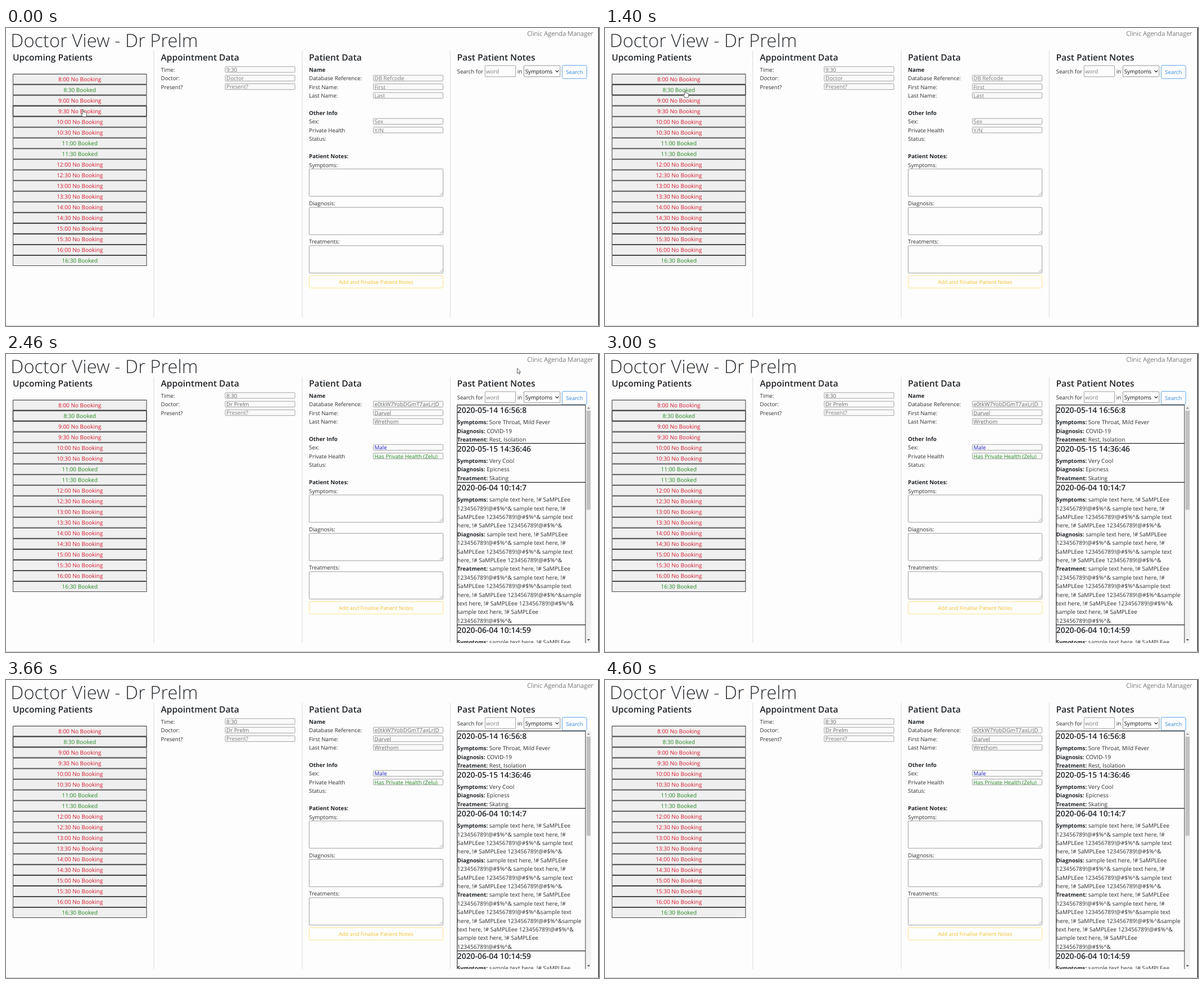
Recreate the animation shown at these times as an HTML page. Size 1055 by 531 pixels, loop 4660 ms.

```html
<!DOCTYPE html>
<html lang="en">
<head>
<meta charset="utf-8">
<title>Doctor View</title>
<style>
  html, body { margin: 0; width: 100%; height: 100%; overflow: hidden; background: #fdfdfd; }
  svg { display: block; width: 1055px; height: 531px; }
  text { font-family: "Open Sans", "Noto Sans", sans-serif; text-rendering: geometricPrecision; white-space: pre; }
</style>
</head>
<body>
<svg id="stage" viewBox="0 0 1055 531"></svg>
<script>
const LOOP = 4660, FOCUS_AT = 1400, LOAD_AT = 1800, BLUR_AT = 4000;
const PAPER = '#fdfdfd', INK = '#2b2f33', DARK = '#212529', GREY = '#777b7f', RED = '#d8192f', GREEN = '#228b22';
const stage = document.getElementById('stage');

function add(parent, tag, attrs, content) {
  const node = document.createElementNS('http://www.w3.org/2000/svg', tag);
  for (const key in attrs) node.setAttribute(key, attrs[key]);
  if (content !== undefined) node.textContent = content;
  parent.appendChild(node);
  return node;
}

// Text is placed by the vertical middle of its capitals.
function label(parent, x, middle, content, { size = 9.8, weight = 400, fill = INK, anchor = 'start' } = {}) {
  return add(parent, 'text', {
    x, y: middle + size * 0.36, 'font-size': size, 'font-weight': weight, fill, 'text-anchor': anchor
  }, content);
}

function box(parent, x, y, width, height, stroke, fill = PAPER, line = 0.9, rx = 1) {
  return add(parent, 'rect', { x, y, width, height, stroke, fill, 'stroke-width': line, rx });
}

function path(parent, d, attrs) {
  return add(parent, 'path', { d, fill: 'none', ...attrs });
}

const heading = (x, content) => label(stage, x, 52.2, content, { size: 15.6, weight: 600, fill: DARK });
const bold = (x, y, content) => label(stage, x, y, content, { weight: 700, fill: DARK });

// Page frame
label(stage, 8.3, 22.5, 'Doctor View - Dr Prelm', { size: 32.7, weight: 300 });
label(stage, 1045, 10, 'Clinic Agenda Manager', { size: 11.5, weight: 300, fill: '#33373b', anchor: 'end' });
for (const x of [263, 527, 790.3]) path(stage, `M${x} 41V515`, { stroke: '#d2d3d4', 'stroke-width': 0.9 });
path(stage, 'M1054.3 0V531', { stroke: '#222', 'stroke-width': 1.3 });
path(stage, 'M0 530.5H1055', { stroke: '#c8c8c8' });
heading(12, 'Upcoming Patients');
heading(275.5, 'Appointment Data');
heading(539, 'Patient Data');
heading(802.5, 'Past Patient Notes');

// Booking slots
const PITCH = 19.02, booked = [1, 6, 7, 17];
const slots = Array.from({ length: 18 }, (_, i) => {
  const y = 81.6 + i * PITCH, isBooked = booked.includes(i);
  const frame = box(stage, 12.5, y + 0.5, 237.6, 18, '#484848', '#efefef', 1.05, 0.3);
  const time = `${8 + (i >> 1)}:${i % 2 ? '30' : '00'}`;
  label(stage, 131.3, y + 9.9, `${time} ${isBooked ? 'Booked' : 'No Booking'}`,
    { size: 10, fill: isBooked ? GREEN : RED, anchor: 'middle' });
  return frame;
});

// Read-only fields; each switches from its first value to its loaded one
const fields = [];
function field(x, y, before, after, fill = '#666a6e') {
  const id = `clip${fields.length}`;
  box(stage, x, y - 5.2, 124, 10.3, '#999', '#fafafa');
  add(add(stage, 'clipPath', { id }), 'rect', { x, y: y - 5, width: 123, height: 9.8 });
  const clipped = add(stage, 'g', { 'clip-path': `url(#${id})` });
  const node = label(clipped, x + 2, y + 0.3, before, { fill: GREY });
  fields.push({ node, before, after, fill });
}
['Time:', 'Doctor:', 'Present?'].forEach((name, i) => label(stage, 275.5, 74.2 + i * 15.4, name));
field(390, 74, '9:30', '8:30');
field(390, 89.4, 'Doctor', 'Dr Prelm');
field(390, 104.6, 'Present?', 'Present?', GREY);

bold(539, 74.5, 'Name');
['Database Reference:', 'First Name:', 'Last Name:'].forEach((name, i) => label(stage, 539, 89.8 + i * 15.4, name));
field(653.5, 89.4, 'DB Refcode', 'e0tkW7YobDGmT7axLrJD');
field(653.5, 104.8, 'First', 'Darvel');
field(653.5, 120.2, 'Last', 'Wrethom');
bold(539, 151.6, 'Other Info');
['Sex:', 'Private Health', 'Status:'].forEach((name, i) => label(stage, 539, 166.8 + i * 15.4, name));
field(653.5, 166.4, 'Sex', 'Male', '#2323c4');
field(653.5, 181.8, 'Y/N', 'Has Private Health (Zelu)', GREEN);

bold(539, 228.6, 'Patient Notes:');
['Symptoms:', 'Diagnosis:', 'Treatments:'].forEach((name, i) => {
  const y = 251.1 + i * 68.4;
  label(stage, 539, y - 7.1, name);
  box(stage, 539.4, y, 238.2, 48.8, '#959595');
  path(stage, `M771.5 ${y + 47}l5 -5M774.3 ${y + 47}l2.2 -2.2`, { stroke: '#888', 'stroke-width': 0.7 });
});
box(stage, 539.4, 441.2, 238.2, 22, '#ffdf80', PAPER, 0.9, 2.5);
label(stage, 658.3, 452.4, 'Add and Finalise Patient Notes', { size: 9.35, fill: '#f2c230', anchor: 'middle' });

// Search bar
label(stage, 802.5, 77.4, 'Search for');
box(stage, 852.3, 67, 54.4, 19.8, '#949494');
label(stage, 854, 77, 'word', { fill: GREY });
label(stage, 909.7, 77.4, 'in');
box(stage, 921.4, 67, 64.4, 19.8, '#888');
label(stage, 923.7, 77.2, 'Symptoms', { fill: '#111' });
path(stage, 'M977.7 75.6l2.8 2.8l2.8 -2.8', { stroke: '#222', 'stroke-width': 1.3 });
box(stage, 989.4, 66.5, 43.8, 23.6, '#4c9be8', PAPER, 0.9, 2.6);
label(stage, 1011.3, 78.3, 'Search', { size: 9.5, fill: '#2f87dd', anchor: 'middle' });

// Past notes; a leading name before the colon is set in bold
const notes = add(stage, 'g', {});
add(add(stage, 'clipPath', { id: 'notesClip' }), 'rect', { x: 802, y: 90, width: 240, height: 425 });
notes.setAttribute('clip-path', 'url(#notesClip)');
const sample = ['sample text here, !# SaMPLEee', '123456789!@#$%^& sample text here, !#',
  'SaMPLEee 123456789!@#$%^& sample text', 'here, !# SaMPLEee 123456789!@#$%^&'];
const entries = [
  [90.8, '2020-05-14 16:56:8', ['Symptoms: Sore Throat, Mild Fever', 'Diagnosis: COVID-19', 'Treatment: Rest, Isolation']],
  [159.4, '2020-05-15 14:36:46', ['Symptoms: Very Cool', 'Diagnosis: Epicness', 'Treatment: Skating']],
  [228.6, '2020-06-04 10:14:7', [
    `Symptoms: ${sample[0]}`, ...sample.slice(1),
    `Diagnosis: ${sample[0]}`, ...sample.slice(1),
    `Treatment: ${sample[0]}`, '123456789!@#$%^& sample text here, !#',
    'SaMPLEee 123456789!@#$%^&sample text', 'here, !# SaMPLEee 123456789!@#$%^&sample',
    'text here, !# SaMPLEee 123456789!@#$%^&', 'sample text here, !# SaMPLEee', '123456789!@#$%^&']],
  [482.6, '2020-06-04 10:14:59', [`Symptoms: ${sample[0]}`]]
];
for (const [top, date, lines] of entries) {
  path(notes, `M802.5 ${top}H1031`, { stroke: '#222', 'stroke-width': 1.2 });
  label(notes, 802.8, top + 9.6, date, { size: 13.9, weight: 600, fill: DARK });
  lines.forEach((line, i) => {
    const [, name, rest] = line.match(/^([A-Z][a-z]+:)?(.*)$/);
    const node = label(notes, 802.8, top + 31 + i * 15.4, '', { size: 10.1 });
    if (name) add(node, 'tspan', { 'font-weight': 700, 'font-size': 9.8, fill: DARK }, name);
    add(node, 'tspan', {}, rest);
  });
}
path(notes, 'M802.8 91V515M1031 91V515', { stroke: '#222', 'stroke-width': 1.1 });
add(notes, 'rect', { x: 1031.6, y: 91, width: 9.4, height: 424, fill: '#f1f1f1' });
add(notes, 'rect', { x: 1032.8, y: 101, width: 7.2, height: 176.5, fill: '#c1c1c1' });
path(notes, 'M1033.8 97.5l2.6 -3l2.6 3z', { fill: '#8a8a8a' });
path(notes, 'M1033.8 508l2.6 3l2.6 -3z', { fill: '#505050' });

// Pointers, drawn from their hot spot
const pen = { fill: '#fff', stroke: '#333', 'stroke-width': 0.75, 'stroke-linejoin': 'round' };
const hand = path(stage, 'M-1 .8Q0 -.6 1 .8V5Q2 4.3 2.8 5.2Q4 4.6 4.6 5.6Q6.2 5.2 6.3 6.8V9.5Q6.2 11 5.2 13H-.6Q-1.5 11.2 -3.4 8.4Q-3 7 -1 8.6Z', pen);
const arrow = path(stage, 'M0 0V9L2 7.2L3.4 10.4L4.8 9.8L3.4 6.7H6.2Z', pen);

const keys = [[0, 137, 145], [130, 137, 145], [530, 142.5, 111], [1530, 142.5, 111],
  [1800, 187.5, 95], [2460, 909.5, 25.5], [2600, 925, -16]];
const ease = u => u * u * (3 - 2 * u);

function pointerAt(t) {
  const next = keys.findIndex(key => key[0] > t);
  if (next < 0) return keys[keys.length - 1].slice(1);
  const [t0, x0, y0] = keys[next - 1], [t1, x1, y1] = keys[next];
  const u = ease((t - t0) / (t1 - t0));
  return [x0 + (x1 - x0) * u, y0 + (y1 - y0) * u];
}

function draw(t) {
  const loaded = t >= LOAD_AT;
  const focused = t < FOCUS_AT ? 3 : t < BLUR_AT ? 1 : -1;
  slots.forEach((slot, i) => {
    slot.setAttribute('stroke', i === focused ? '#1c1c1c' : '#484848');
    slot.setAttribute('stroke-width', i === focused ? 1.3 : 1.05);
  });
  for (const { node, before, after, fill } of fields) {
    node.textContent = loaded ? after : before;
    node.setAttribute('fill', loaded ? fill : GREY);
  }
  notes.setAttribute('visibility', loaded ? 'visible' : 'hidden');

  const [x, y] = pointerAt(t);
  const overSlots = x < 250 && y > 82;
  hand.setAttribute('visibility', overSlots ? 'visible' : 'hidden');
  arrow.setAttribute('visibility', overSlots || t >= 2600 ? 'hidden' : 'visible');
  for (const pointer of [hand, arrow]) pointer.setAttribute('transform', `translate(${x} ${y})`);
}

const start = performance.now();
function tick() {
  draw((performance.now() - start) % LOOP);
  requestAnimationFrame(tick);
}
tick();
</script>
</body>
</html>
```
